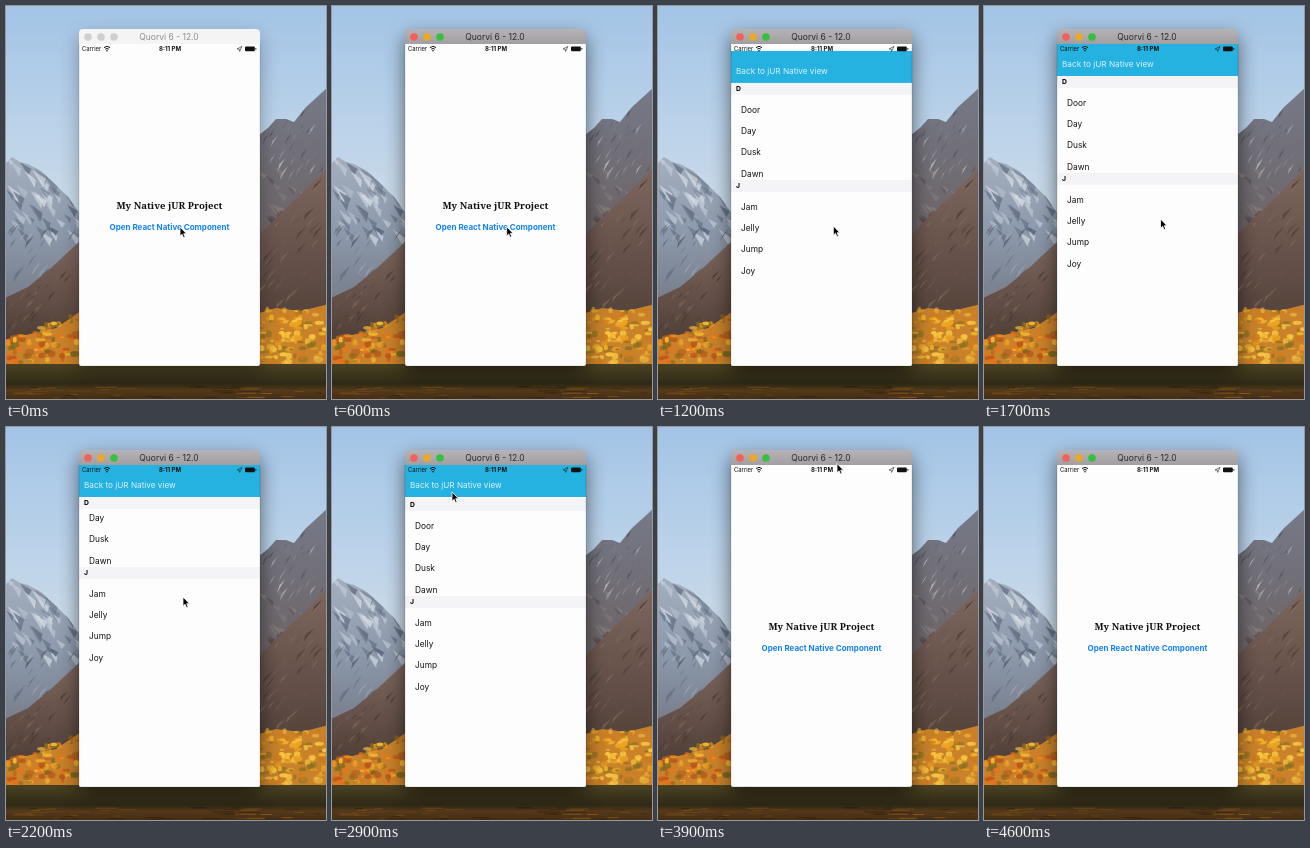
Animation of 320x393 px, one loop 4700 ms. Source, as an HTML page:

```html
<!DOCTYPE html>
<html lang="en">
<head>
<meta charset="utf-8">
<style>
  html, body { margin: 0; width: 100%; height: 100%; overflow: hidden; }
  svg { display: block; width: 100%; height: 100%; }
  text { font-family: Inter, "Liberation Sans", sans-serif; }
  .mid { text-anchor: middle; }
  .bold { font-weight: 700; }
</style>
</head>
<body>
<svg viewBox="0 0 320 393" preserveAspectRatio="none">
  <defs>
    <linearGradient id="sky" x2="0" y2="1">
      <stop offset="0" stop-color="#a3c4e6"/><stop offset=".3" stop-color="#bad2e9"/>
      <stop offset=".65" stop-color="#d6dfe8"/><stop offset="1" stop-color="#e3e1e2"/>
    </linearGradient>
    <linearGradient id="snow" x2="0" y2="1">
      <stop offset="0" stop-color="#a6b0c0"/><stop offset=".5" stop-color="#8d99ac"/><stop offset="1" stop-color="#747a87"/>
    </linearGradient>
    <linearGradient id="rock" x2="0" y2="1">
      <stop offset="0" stop-color="#767a88"/><stop offset=".4" stop-color="#6f6a70"/><stop offset="1" stop-color="#66564f"/>
    </linearGradient>
    <linearGradient id="hill" x2="0" y2="1">
      <stop offset="0" stop-color="#7d675d"/><stop offset=".5" stop-color="#66514a"/><stop offset="1" stop-color="#4c3d33"/>
    </linearGradient>
    <linearGradient id="shore" x2="0" y2="1">
      <stop offset="0" stop-color="#4b4222"/><stop offset=".5" stop-color="#2e2a16"/>
      <stop offset=".65" stop-color="#55391a"/><stop offset="1" stop-color="#3c2813"/>
    </linearGradient>
    <linearGradient id="bar" x2="0" y2="1">
      <stop offset="0" stop-color="#b5b3b5"/><stop offset="1" stop-color="#a19fa1"/>
    </linearGradient>
    <filter id="shadow" x="-40%" y="-30%" width="180%" height="160%">
      <feGaussianBlur stdDeviation="10"/>
    </filter>
    <filter id="soft"><feGaussianBlur stdDeviation=".6"/></filter>
    <clipPath id="screen"><path d="M73 38H254V358q0 2-2 2H75q-2 0-2-2Z"/></clipPath>
    <clipPath id="listArea"><path d="M73 70H254V360H73Z"/></clipPath>
    <clipPath id="leftPeak"><path d="M-3 160L6 151 14 156 22 158 35 165 50 179 62 191 75 209V300H-3Z"/></clipPath>
    <clipPath id="rightPeak"><path d="M250 131L262 122 270 113 280 113 288 116 300 101 310 92 323 80V340H250Z"/></clipPath>
  </defs>

  <rect width="320" height="393" fill="url(#sky)"/>
  <g filter="url(#soft)">
    <g clip-path="url(#leftPeak)"><rect x="-3" y="145" width="80" height="160" fill="url(#snow)"/><g id="leftSnow"/></g>
    <g clip-path="url(#rightPeak)"><rect x="250" y="78" width="75" height="265" fill="url(#rock)"/><g id="rightSnow"/></g>
    <path d="M-3 293L22 281 45 262 75 234V340H-3Z" fill="url(#hill)"/>
    <path d="M250 232L275 207 295 188 323 160V340H250Z" fill="url(#hill)"/>
    <g id="scree"/>
    <path d="M-3 334L20 329 50 322 75 305V362H-3ZM250 308L270 302 295 305 323 298V362H250Z" fill="#c9822a"/>
    <g id="foliage"/>
    <rect x="-3" y="358" width="326" height="40" fill="url(#shore)"/>
    <g id="water"/>
  </g>

  <rect id="shade" x="73" y="31" width="181" height="336" rx="4" filter="url(#shadow)"/>
  <path id="titleBar" d="M73 38V27q0-4 4-4H250q4 0 4 4V38Z"/>
  <g id="lights"><circle cx="82" cy="31" r="3.8"/><circle cx="95" cy="31" r="3.8"/><circle cx="108" cy="31" r="3.8"/></g>
  <text id="title" class="mid" x="163" y="34" font-size="8.5">Quorvi 6 - 12.0</text>

  <g clip-path="url(#screen)">
    <rect x="73" y="38" width="181" height="322" fill="#fefdfe"/>
    <text class="mid" x="163.5" y="203" font-size="9.6" fill="#111" style="font-family:'Noto Serif',serif;font-weight:600">My Native jUR Project</text>
    <text class="mid bold" x="163.5" y="224.3" font-size="8" fill="#1583f0">Open React Native Component</text>
    <g id="sheet">
      <rect x="73" y="38" width="181" height="322" fill="#fefdfe"/>
      <g clip-path="url(#listArea)"><g id="list"></g></g>
      <rect x="73" y="38" width="181" height="32" fill="#25b2e0"/>
      <text x="78" y="61" font-size="8.2" fill="#d9f3fc">Back to jUR Native view</text>
    </g>
    <g fill="#111">
      <text x="76" y="45" font-size="5.9">Carrier</text>
      <text class="mid bold" x="164" y="45" font-size="6">8:11 PM</text>
      <path d="M98 41.6q3-2.6 6 0M99.2 43.2q1.8-1.5 3.6 0" fill="none" stroke="#111" stroke-width="1"/>
      <circle cx="101" cy="44.8" r=".8"/>
      <path d="M231 43L236 40.4 233.6 45.4 233.3 43.2Z" fill="none" stroke="#222" stroke-width=".6"/>
      <rect x="239" y="40.4" width="9.8" height="4.8" rx="1"/>
      <rect x="249.4" y="42" width=".9" height="1.7"/>
    </g>
  </g>
  <path d="M73 38V358q0 2 2 2H252q2 0 2-2V38" fill="none" stroke="#0004" stroke-width=".5"/>
  <path id="cursor" d="M0 0V9.2L2.1 7.3 3.5 10.6 5.1 9.9 3.7 6.7H6.5Z" fill="#000" stroke="#fff" stroke-width=".8"/>
</svg>
<script>
(() => {
  const LOOP = 4700, STEP = 100, SHEET_HEIGHT = 322;
  const ACTIVATE = 500, PRESENT = 885, DISMISS = 3320;
  const $ = id => document.getElementById(id);

  function add(parent, tag, attrs, label) {
    const node = document.createElementNS("http://www.w3.org/2000/svg", tag);
    for (const name in attrs) node.setAttribute(name, attrs[name]);
    if (label) node.textContent = label;
    parent.append(node);
    return node;
  }

  let seed = 11;
  function random(min = 0, max = 1) {
    seed = (seed * 16807) % 2147483647;
    return min + (max - min) * seed / 2147483647;
  }
  const pick = list => list[Math.floor(random(0, list.length))];

  function streaks(parent, count, [x0, x1], yRange, length, slope, colors) {
    for (let i = 0; i < count; i++) {
      const x = random(x0, x1), [y0, y1] = yRange(x);
      const y = random(y0, y1), len = random(.4, 1) * length;
      add(parent, "path", {
        d: `M${x} ${y}l${len * slope} ${len}l${random(1, 4)} ${-len * .5}Z`,
        fill: pick(colors), opacity: random(.35, .85)
      });
    }
  }

  function leaves(count, [x0, x1], edge, colors) {
    for (let i = 0; i < count; i++) {
      const x = random(x0, x1);
      add($("foliage"), "ellipse", {
        cx: x, cy: random(edge(x), 357), rx: random(1.5, 5), ry: random(1, 3.4),
        fill: pick(colors), opacity: random(.5, .95)
      });
    }
  }

  streaks($("leftSnow"), 60, [0, 72], () => [150, 225], 19, .6, ["#d9dfe8", "#c5cedb", "#667287", "#566379"]);
  streaks($("leftSnow"), 30, [0, 72], () => [205, 275], 16, -.7, ["#a9afb9", "#656c7a", "#535b69"]);
  streaks($("rightSnow"), 45, [252, 320], () => [90, 170], 15, -.6, ["#c0c5cf", "#50535f", "#4a4d58", "#9499a5"]);
  streaks($("rightSnow"), 20, [252, 300], () => [160, 215], 14, .7, ["#8b8381", "#55494a"]);
  streaks($("scree"), 40, [8, 72], x => [300 - x * .8, 318], 12, -.8, ["#8d7264", "#493a34", "#3f322d"]);
  streaks($("scree"), 50, [258, 320], x => [232 - (x - 254), 295], 14, -.8, ["#8a7062", "#4d3d37", "#7a6258"]);
  leaves(110, [0, 74], x => 333 - x * .36, ["#ef9a1f", "#e8741c", "#f5b834", "#b85a1c", "#80691f"]);
  leaves(110, [254, 320], () => 303, ["#f3b62b", "#eda21f", "#f7c944", "#cf7a1d", "#8d7222"]);
  for (let i = 0; i < 45; i++) {
    add($("water"), "rect", {
      x: random(-5, 315), y: random(380, 392), width: random(6, 24), height: 1,
      fill: pick(["#8a5a1d", "#24190c", "#a86d20"]), opacity: random(.2, .6)
    });
  }

  // Section list: each header is followed by its rows.
  const HEADER = 11.8, ROW = 21.3;
  const sections = { D: ["Door", "Day", "Dusk", "Dawn"], J: ["Jam", "Jelly", "Jump", "Joy"] };
  const headers = [];
  let rowTop = 70;
  for (const letter in sections) {
    const header = add($("list"), "g", {});
    add(header, "rect", { x: 73, y: rowTop, width: 181, height: HEADER, fill: "#f4f3f5" });
    add(header, "text", { x: 78, y: rowTop + 8.4, "font-size": 6.8, class: "bold" }, letter);
    headers.push(header);
    rowTop += HEADER;
    for (const word of sections[letter]) {
      add($("list"), "text", { x: 83, y: rowTop + 18, "font-size": 8.3, fill: "#111" }, word);
      rowTop += ROW;
    }
  }
  $("list").append(...headers);

  // Keyframes are [time, ...values], eased between neighbours.
  function track(keys, time) {
    const next = keys.findIndex(key => key[0] > time);
    if (next < 0) return keys[keys.length - 1].slice(1);
    const from = keys[next - 1], to = keys[next];
    const p = (time - from[0]) / (to[0] - from[0]), eased = p * p * (3 - 2 * p);
    return from.slice(1).map((value, i) => value + (to[i + 1] - value) * eased);
  }
  const cursorKeys = [
    [0, 174, 221], [1000, 175, 220.5], [1500, 176, 219], [1700, 176.5, 213], [2200, 177, 170],
    [2300, 177, 170], [2600, 172, 198], [2900, 120, 65], [3050, 116, 58], [3400, 116, 58],
    [3900, 179, 36.5], [4200, 325, 60]
  ];
  const scrollKeys = [[0, 0], [1700, 0], [2200, -27], [2300, -27], [2500, 0], [2650, 12], [2900, 1.9], [3050, 0]];

  // Share of the distance left, for a critically damped spring.
  function remaining(ms) {
    const u = Math.max(0, ms) * .01826;
    return (1 + u) * Math.exp(-u);
  }
  const move = (node, x, y) => node.setAttribute("transform", `translate(${x} ${y})`);

  function draw(time) {
    const active = time >= ACTIVATE;
    $("titleBar").setAttribute("fill", active ? "url(#bar)" : "#f5f4f5");
    $("title").setAttribute("fill", active ? "#2b292b" : "#8f8d8f");
    $("shade").setAttribute("opacity", active ? .55 : .3);
    const colors = active ? ["#f4605a", "#e9a829", "#35bf43"] : ["#d0ced0", "#d0ced0", "#d0ced0"];
    [...$("lights").children].forEach((light, i) => light.setAttribute("fill", colors[i]));

    const hidden = time < DISMISS ? remaining(time - PRESENT) : 1 - remaining(time - DISMISS);
    move($("sheet"), 0, hidden * SHEET_HEIGHT);

    const [scroll] = track(scrollKeys, time);
    move($("list"), 0, scroll);
    move(headers[0], 0, Math.max(0, -scroll));
    move($("cursor"), ...track(cursorKeys, time));
  }

  const start = performance.now();
  function tick() {
    const time = (performance.now() - start) % LOOP;
    draw(Math.floor(time / STEP) * STEP);
    requestAnimationFrame(tick);
  }
  tick();
})();
</script>
</body>
</html>
```
